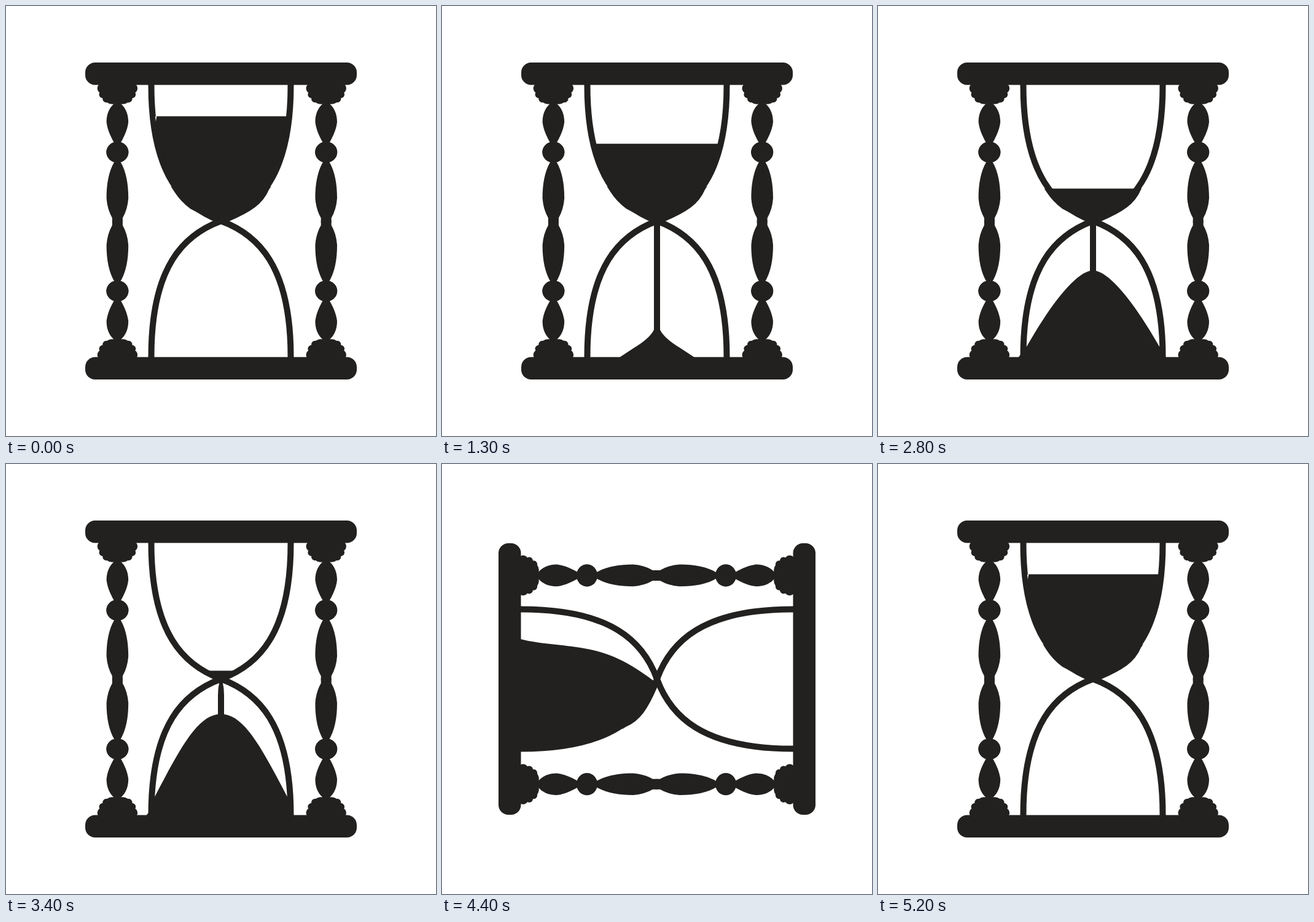
An HTML page that plays this animation: 700 by 700 pixels, repeating every 5400 ms.

```html
<!DOCTYPE html>
<html lang="en">
<head>
<meta charset="utf-8">
<title>Hourglass</title>
<style>
  html, body { margin: 0; width: 100%; height: 100%; overflow: hidden; background: #fff; }
  svg { display: block; width: 100%; height: 100%; }
</style>
</head>
<body>
<svg viewBox="0 0 700 700">
  <defs>
    <path id="bulb" d="M236.5 120V129C236.5 277 290 328 350 350C410 328 463.5 277 463.5 129V120"/>
    <path id="sag" d="M268 293L274.5 303Q284 318 300 330L336 349L350 345Z
      M432 293L428 299Q421 316 405 328Q390 339 364 350L350 345Z"/>
    <g id="quarter">
      <path d="M-2 120H29V127A8.5 8.5 0 0 1 29 141A6 6 0 0 1 24 150A6 6 0 0 1 17 157A14 14 0 0 1 6 159.5
        C12 165 17.8 174 17.8 189C16 204 9 216 4 225V252C14 268 17.8 289 17.8 313Q16.5 331 8.5 345V352H-2Z"/>
      <ellipse cy="238" rx="18" ry="17"/>
    </g>
    <g id="half">
      <use href="#quarter"/>
      <use href="#quarter" transform="scale(-1 1)"/>
    </g>
    <g id="column">
      <use href="#half"/>
      <use href="#half" transform="matrix(1 0 0 -1 0 702)"/>
    </g>
    <clipPath id="below"><rect id="level" x="200" width="300" height="300"/></clipPath>
    <clipPath id="lower">
      <use href="#bulb" transform="matrix(1 0 0 -1 0 700)"/>
      <use href="#sag" transform="matrix(1 0 0 -1 0 700)"/>
    </clipPath>
  </defs>
  <rect width="700" height="700" fill="#fff"/>
  <g id="scene" fill="#22211f">
    <rect x="129" y="92" width="442" height="36.5" rx="16"/>
    <rect x="129" y="571.5" width="442" height="36.5" rx="16"/>
    <use href="#column" x="181.4"/>
    <use href="#column" x="521.2"/>
    <g clip-path="url(#below)">
      <use href="#bulb"/>
      <use id="bulge" href="#sag"/>
    </g>
    <g clip-path="url(#lower)">
      <path id="heap"/>
      <use href="#heap" transform="matrix(-1 0 0 1 700 0)"/>
      <path id="slump"/>
    </g>
    <path id="chip" d="M228.5 572L232.5 567V572Z"/>
    <path id="stream"/>
    <g fill="none" stroke="#22211f" stroke-width="10">
      <use href="#bulb"/>
      <use href="#bulb" transform="matrix(1 0 0 -1 0 700)"/>
    </g>
    <path id="gap" fill="#fff" d="M243 179.5H245.3L243.8 188Z"/>
  </g>
</svg>
<script>
const LOOP = 5400, TURN = 3800, RESET = 5200;
const el = id => document.getElementById(id);
const clamp = (v, lo, hi) => Math.min(hi, Math.max(lo, v));
const stepsSince = (t, start, size) => Math.max(0, Math.floor((t - start) / size));

// Surface of the upper sand: first trickle, then even drops that slow near the neck.
function levelAt(t) {
  if (t >= RESET) return 180;
  if (t < 1300) return 180 + 3 * Math.min(6, stepsSince(t, 100, 100));
  const p = Math.min(8, stepsSince(t, 1000, 300));
  const n = p - (p > 2) - (p > 4);
  const drained = 198 + 80 / 3 * Math.min(n, 3) + 59 / 3 * Math.max(n - 3, 0);
  return drained + 8 * stepsSince(t, 3500, 100);
}

// Right half of the heap after m growth steps: a flared cone, later a round mound.
function heapAt(t) {
  if (t < 1100 || t >= TURN + 400) return "";
  const p = Math.min(7, stepsSince(t, 1000, 300));
  const m = p - (p > 3);
  const peak = 548.6 - 23.6 * m;
  if (m < 4) {
    const w = Math.min(22 + 39 * m, 104), bend = 572 - 0.25 * w;
    return `M349 573V${peak - 2}L355 ${peak + 2}` +
      `Q${350 + Math.max(5, 11.5 * m)} ${(peak + bend) / 2} ${350 + 0.62 * w} ${bend}L${350 + w} 572Z`;
  }
  const foot = 616 - 12.5 * m, h = foot - peak;
  return `M349 573V${peak}H350C${350 + 12.5 * (m - 3)} ${peak} 416 ${foot - 0.59 * h} 457.5 ${foot}L476 573Z`;
}

// Sand sliding towards the neck while the glass turns, k turns of the hand in.
function slumpAt(k) {
  if (k < 2 || k > 6) return "";
  if (k === 6) return "M480 555L220 485V349H480Z";
  const foot = 175.5 + 36.5 * k, neck = 375 - 6 * k, bulge = 18 * k - 33;
  let d = "M480 573";
  for (let u = 0; u <= 1; u += 1 / 32) {
    const x = foot + (neck - foot) * u - bulge * Math.sin(Math.PI * u ** 1.4);
    d += `L${x} ${572 - 222 * u}`;
  }
  return d + "L480 349Z";
}

// Falling sand; head and tail are the lengths of the tapered ends.
function streamPath(top, end, tail, head) {
  const a = top + tail, b = end - head, tip = head ? 1 : 5, root = tail ? 2.5 : 5;
  return `M${350 - root} ${top}Q345 ${top + tail / 2} 345 ${a}V${b}Q345 ${b + head / 2} ${350 - tip} ${end}` +
    `H${350 + tip}Q355 ${b + head / 2} 355 ${b}V${a}Q355 ${top + tail / 2} ${350 + root} ${top}Z`;
}

function streamAt(t) {
  if (t < 200 || t >= TURN) return "";
  if (t < 900) {
    const end = 350 + 200 / 6 * Math.min(6, stepsSince(t, 100, 100));
    return streamPath(352, end, 0, Math.min(63, end - 354));
  }
  if (t < 3400) return streamPath(352, 560, 0, 0);
  return streamPath(354 + 18 * stepsSince(t, 3500, 100), 440, 22, 0);
}

const show = (id, on) => el(id).setAttribute("visibility", on ? "visible" : "hidden");

function draw(t) {
  const level = levelAt(t);
  const k = t >= RESET ? 0 : stepsSince(t, TURN, 200);
  const angle = 30 * k - (k > 4 ? 15 : 0);
  el("scene").setAttribute("transform", `rotate(${angle} 350 350)`);
  el("level").setAttribute("y", level - 0.4);
  el("heap").setAttribute("d", heapAt(t));
  el("slump").setAttribute("d", slumpAt(k));
  el("stream").setAttribute("d", streamAt(t));
  show("bulge", level < 310);
  show("gap", level === 180);
  show("chip", t >= 2800 && t < 4000);
}

const start = performance.now();
function tick() {
  draw((performance.now() - start) % LOOP);
  requestAnimationFrame(tick);
}
tick();
</script>
</body>
</html>
```
